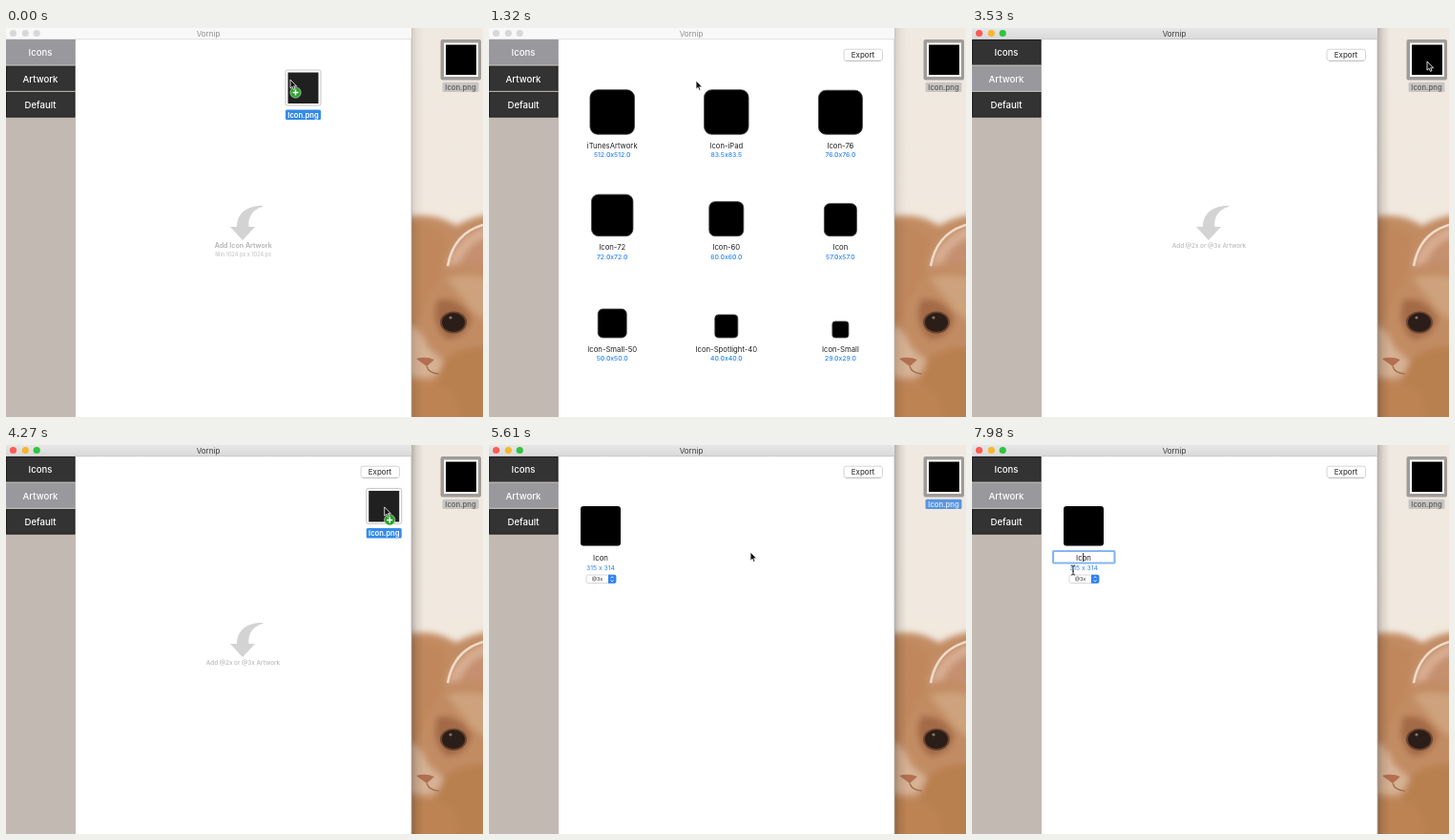
These frames come from a looping animation (500x407 px, 8 s). An HTML page:

```html
<!DOCTYPE html>
<html lang="en">
<head>
<meta charset="utf-8">
<title>Icon export</title>
<style>
html, body { margin: 0; width: 100%; height: 100%; overflow: hidden; background: #fff; }
svg { display: block; width: 100vw; height: 100vh; }
text { font-family: Inter, "Open Sans", sans-serif; text-anchor: middle; }
</style>
</head>
<body>
<svg id="stage" viewBox="0 0 500 407" xmlns="http://www.w3.org/2000/svg">
  <defs>
    <linearGradient id="wall" x2="0" y2="1">
      <stop offset="0" stop-color="#f0e9e1"/>
      <stop offset=".5" stop-color="#f1e8de"/>
      <stop offset="1" stop-color="#e9d9cb"/>
    </linearGradient>
    <linearGradient id="shade">
      <stop offset="0" stop-color="#000" stop-opacity=".24"/>
      <stop offset=".4" stop-color="#000" stop-opacity=".1"/>
      <stop offset="1" stop-color="#000" stop-opacity="0"/>
    </linearGradient>
    <linearGradient id="bar" x2="0" y2="1">
      <stop offset="0" stop-color="#e6e6e6"/>
      <stop offset="1" stop-color="#d9d9d9"/>
    </linearGradient>
    <filter id="soft" x="-20%" y="-20%" width="140%" height="140%"><feGaussianBlur stdDeviation="3"/></filter>
    <clipPath id="desk"><rect x="425" width="75" height="407"/></clipPath>
  </defs>

  <g clip-path="url(#desk)">
    <rect x="425" width="75" height="407" fill="url(#wall)"/>
    <g filter="url(#soft)">
      <path d="M410 200C435 193 455 196 472 207Q487 197 515 194V425H410Z" fill="#c28c64"/>
      <path d="M410 205Q446 202 462 218L456 262Q440 280 434 306L410 316Z" fill="#c0875c"/>
      <path d="M462 250Q472 214 515 204V250Q485 240 462 250Z" fill="#d8ad92"/>
      <path d="M476 246Q484 222 515 216V252Z" fill="#c58f70"/>
      <path d="M410 312Q432 306 442 334L460 350Q456 366 438 366L410 362Z" fill="#d6b193"/>
      <path d="M462 262Q490 254 515 266V310Q490 302 480 284Z" fill="#cda27c"/>
      <path d="M452 284Q476 280 488 304Q484 324 462 326Q444 310 452 284Z" fill="#a36b46"/>
      <path d="M462 344Q486 330 515 334V425H440Q446 368 462 344Z" fill="#b9804f"/>
      <path d="M410 370Q450 366 470 384L480 425H410Z" fill="#bd8353"/>
    </g>
    <path d="M463 249Q469 215 500 206" fill="none" stroke="#f0dccb" stroke-width="2.5"/>
    <ellipse cx="469" cy="308" rx="14" ry="11.5" fill="#6b452f"/>
    <ellipse cx="469" cy="308" rx="12" ry="10" fill="#2b1d18"/>
    <circle cx="466" cy="303" r="1.6" fill="#8c7466"/>
    <path d="M430 346Q440 343 449 347L441 354Z" fill="#b26f52"/>
    <path d="M441 354Q443 361 454 362" fill="none" stroke="#9c6a4a" stroke-width="1.2"/>
    <rect id="shadow" x="425" width="13" height="407" fill="url(#shade)"/>
  </g>

  <g id="file"></g>

  <rect width="425" height="407" fill="#fff"/>
  <rect y="12" width="73" height="395" fill="#c3b9b3"/>
  <path d="M425 0V407" stroke="#b5b3b1" stroke-width=".8"/>
  <rect id="title" width="425" height="12"/>
  <path id="edge" d="M0 11.7H425" stroke-width=".7"/>
  <g id="lights"></g>
  <text id="name" x="212" y="8.7" font-size="8">Vornip</text>
  <g id="tabs"></g>

  <g id="export">
    <rect x="372" y="22.2" width="40.5" height="12" rx="2.5" fill="#fff" stroke="#c9c9c9" stroke-width=".8"/>
    <path d="M374 34.5H410.5" stroke="#adadad" stroke-width=".6"/>
    <text x="392" y="31" font-size="7.9" fill="#222">Export</text>
  </g>

  <g id="hint">
    <path d="M269 186C252 186 242 194 242 208H235L248 222 261 208H254.5C253.5 198 258 190 269 187Z" fill="#d3d3d3"/>
    <g id="hintIcons" font-weight="600">
      <text x="248.7" y="230.4" font-size="7.1" fill="#b2b2b2">Add Icon Artwork</text>
      <text x="248.7" y="238.8" font-size="5.5" fill="#cfcfcf">Min 1024 px x 1024 px</text>
    </g>
    <text id="hintArt" x="248.5" y="230.3" font-size="6.3" font-weight="600" fill="#c2c2c2">Add @2x or @3x Artwork</text>
  </g>

  <g id="grid"></g>

  <g id="art">
    <rect x="96" y="64" width="42" height="41.5" rx="3" fill="#000"/>
    <g id="field">
      <rect x="85" y="111" width="64.5" height="12.5" rx="1" fill="#fff" stroke="#86b6f0" stroke-width="2.2"/>
      <path d="M116.5 113V122" stroke="#111" stroke-width=".8"/>
    </g>
    <text x="117" y="120.6" font-size="7.8" fill="#222">Icon</text>
    <text x="117" y="131.3" font-size="6.8" fill="#2f83ea">315 x 314</text>
    <rect x="102" y="136" width="31" height="8.5" rx="2" fill="#fff" stroke="#c8c8c8" stroke-width=".7"/>
    <path d="M125 135.7H131.5Q133.3 135.7 133.3 137.5V143Q133.3 144.8 131.5 144.8H125Z" fill="#2d82f0"/>
    <path d="M127.6 139.3L129.1 137.6 130.6 139.3M127.6 141.3L129.1 143 130.6 141.3" fill="none" stroke="#fff" stroke-width=".8"/>
    <text x="113.5" y="142.2" font-size="5.4" fill="#333">@3x</text>
  </g>

  <g id="drag">
    <rect x="-18.5" y="-18.5" width="37" height="37" rx="2" fill="#fff" stroke="#c4c4c4"/>
    <rect x="-16" y="-16" width="32" height="32.5" fill="#202020"/>
    <rect x="-18.5" y="23" width="37" height="10.5" rx="1.5" fill="#348be8"/>
    <text y="31" font-size="7.6" font-weight="600" fill="#fff">Icon.png</text>
  </g>

  <g id="cursor">
    <g id="plus">
      <circle cx="5.5" cy="13.5" r="5.6" fill="#27a327" stroke="#e4f3e4" stroke-width=".6"/>
      <path d="M2.5 13.5H8.5M5.5 10.5V16.5" stroke="#fff" stroke-width="1.5"/>
    </g>
    <path id="arrow" d="M0 0V9.2L2.1 7.3 3.5 10.4 5 9.7 3.7 6.8H6.6Z" fill="#111" stroke="#fff" stroke-width=".8"/>
    <path id="beam" d="M-2 0Q0 0 0 1.5Q0 0 2 0M0 1.5V8.5M-2 10Q0 10 0 8.5Q0 10 2 10M-1 6H1" fill="none" stroke="#222" stroke-width=".9"/>
  </g>
</svg>
<script>
const LOOP = 8000, TICK = 147.8;
const $ = id => document.getElementById(id);
const show = (id, on) => $(id).setAttribute('visibility', on ? 'visible' : 'hidden');
const rect = (x, y, w, h, fill, more = '') =>
  `<rect x="${x}" y="${y}" width="${w}" height="${h}" fill="${fill}" ${more}/>`;
const text = (s, x, y, size, fill, more = '') =>
  `<text x="${x}" y="${y}" font-size="${size}" fill="${fill}" ${more}>${s}</text>`;

$('file').innerHTML = rect(455.5, 12, 42.5, 42.5, '#9f9b98', 'rx="2"') +
  rect(459, 15.5, 36, 35.5, '#fff') + rect(461, 17.5, 32, 31.5, '#000') +
  '<rect id="tag" x="457.5" y="56.8" width="38" height="10.2" rx="1.5"/>' +
  text('Icon.png', 476.5, 64.7, 7.6, '#666', 'id="tagText" font-weight="600"');

const lightX = [7.5, 20.3, 32.2], lightOn = ['#fc5b57', '#f4b72f', '#2fc440'];
$('lights').innerHTML = lightX.map(x => `<circle cx="${x}" cy="5.5" r="3.6"/>`).join('');

const tabTop = i => 12 + i * 27.3;
$('tabs').innerHTML = ['Icons', 'Artwork', 'Default'].map((s, i) =>
  rect(.5, tabTop(i) + .5, 71.5, 26, '#333') +
  text(s, 36, tabTop(i) + 17.2, 9.6, '#fff', 'font-weight="500"')
).join('') + `<path d="M0 ${tabTop(1) - .3}H72.5M0 ${tabTop(2) - .3}H72.5" stroke="#d2ccc8" stroke-width=".9"/>`;
const tabs = $('tabs').querySelectorAll('rect');

// rows: tile bottom, then label, dimension and drawn size per column
const rows = [
  [111.2, ['iTunesArtwork', '512.0', 46.5], ['Icon-iPad', '83.5', 46.5], ['Icon-76', '76.0', 46]],
  [217.7, ['Icon-72', '72.0', 43.5], ['Icon-60', '60.0', 36], ['Icon', '57.0', 34]],
  [324, ['Icon-Small-50', '50.0', 30], ['Icon-Spotlight-40', '40.0', 24], ['Icon-Small', '29.0', 17]]
];
$('grid').innerHTML = rows.map(([bottom, ...cells]) => cells.map(([label, dim, size], i) => {
  const x = 129.2 + i * 119.6;
  return rect(x - size / 2, bottom - size, size, size, '#000', `rx="${size * .17}" stroke="#3c3c3c" stroke-width=".8"`) +
    text(label, x, bottom + 14.7, 7.7, '#222') +
    text(`${dim}x${dim}`, x, bottom + 24.1, 6.8, '#2484f5', 'font-weight="500"');
}).join('')).join('');

// pointer path: tick, x, y
const path = [
  [0, 298, 54], [2, 217, 55], [11, 217, 55], [14, 53, 53], [18, 53, 53], [23, 474, 30],
  [24, 477, 35], [26, 477, 35], [33, 273, 111], [36, 274, 112], [38, 274, 112],
  [43, 132, 134], [45, 124, 139], [46, 124, 139], [50, 114, 115], [51, 114, 115], [54, 106, 126]
];
function pointer(n) {
  let i = 0;
  while (i < path.length - 2 && path[i + 1][0] <= n) i++;
  const [t0, x0, y0] = path[i], [t1, x1, y1] = path[i + 1];
  const u = Math.min(1, (n - t0) / (t1 - t0)), e = u * u * (3 - 2 * u);
  return [x0 + (x1 - x0) * e, y0 + (y1 - y0) * e];
}

function draw(ms) {
  const n = Math.floor((ms + 20) / TICK);
  const within = (a, b) => n >= a && n < b;
  const active = n >= 16, artTab = n >= 17;
  const first = n < 4, second = within(27, 36);
  const [x, y] = pointer(n);

  $('title').setAttribute('fill', active ? 'url(#bar)' : '#f8f8f8');
  $('edge').setAttribute('stroke', active ? '#c2c2c2' : '#d6d6d6');
  $('name').setAttribute('fill', active ? '#3c3c3c' : '#8f8f8f');
  $('shadow').setAttribute('opacity', active ? 1 : .5);
  [...$('lights').children].forEach((c, i) => c.setAttribute('fill', active ? lightOn[i] : '#d8d8d8'));
  tabs.forEach((r, i) => {
    const on = i === +artTab;
    r.setAttribute('fill', on ? '#98989d' : '#333');
    r.setAttribute('stroke', on ? '#98989d' : '#1e1e1e');
  });

  show('export', n >= 4);
  show('grid', n >= 4 && !artTab);
  show('hint', first || within(17, 36));
  show('hintIcons', first);
  show('hintArt', within(17, 36));
  show('art', n >= 36);
  show('field', n >= 52);

  const blue = within(4, 7) || within(36, 40);
  $('tag').setAttribute('fill', blue ? '#5a95de' : '#c8c5c2');
  $('tagText').setAttribute('fill', blue ? '#d6e4f5' : '#666');

  show('drag', first || second);
  const [dx, dy] = first ? [13.5, 8.5] : [-.5, -1];
  $('drag').setAttribute('transform', `translate(${x + dx} ${y + dy})`);
  $('cursor').setAttribute('transform', `translate(${x} ${y})`);
  show('plus', first || (second && x < 425));
  show('arrow', n < 52);
  show('beam', n >= 52);
}

const start = performance.now();
function frame() {
  draw((performance.now() - start) % LOOP);
  requestAnimationFrame(frame);
}
frame();
</script>
</body>
</html>
```
